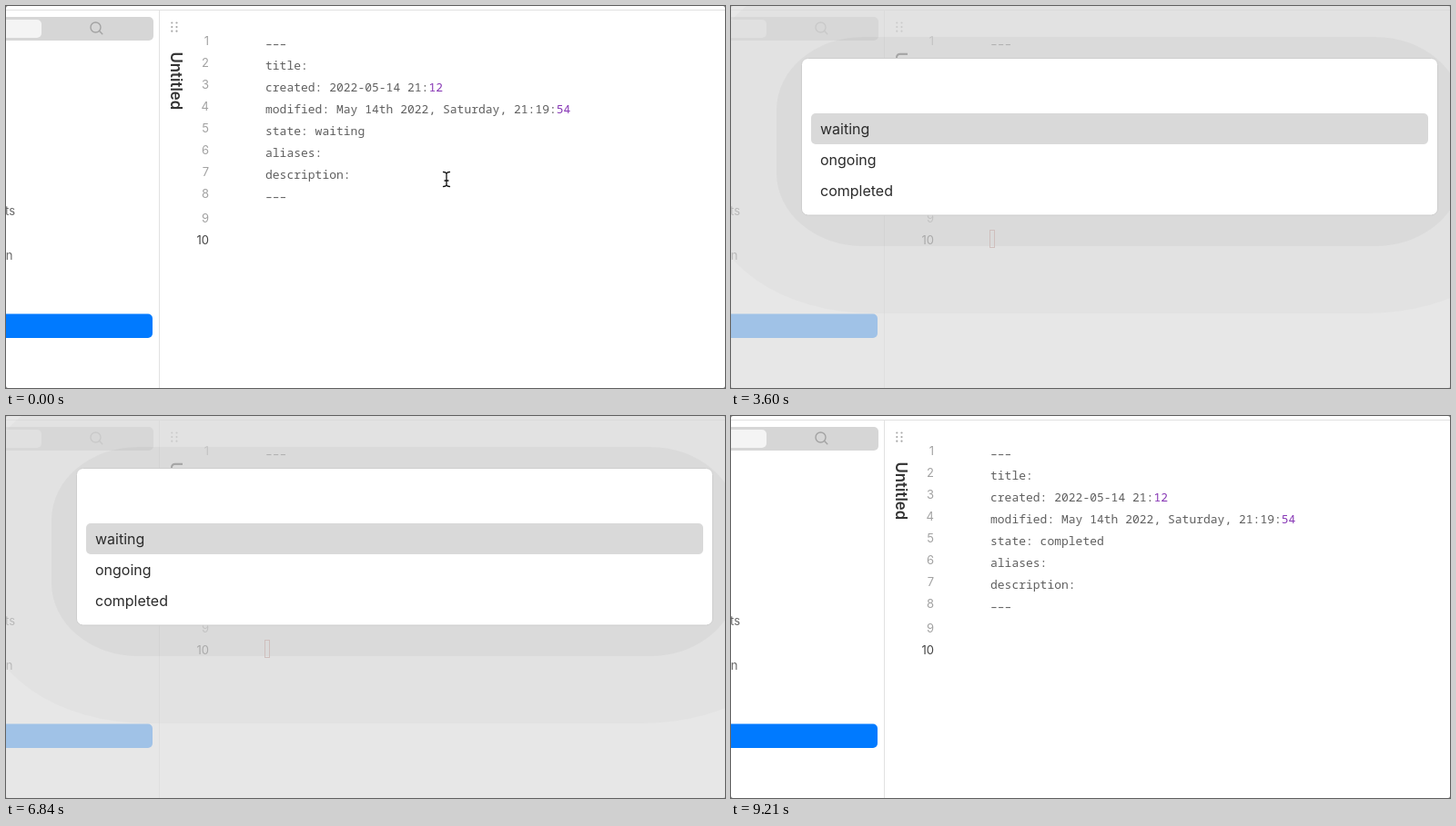
Write an HTML page that moves like this. It is 790 px wide and 420 px high and loops after 9.54 s.

```html
<!DOCTYPE html>
<html lang="en">
<head>
<meta charset="utf-8">
<title>Property switcher</title>
<style>
  html, body { margin: 0; width: 100%; height: 100%; overflow: hidden; background: #fff; }
  svg { display: block; width: 790px; height: 420px; }
  text { white-space: pre; }
  .ui { font-family: Inter, Roboto, sans-serif; font-size: 13px; fill: #666; }
  .code { font-family: "Noto Sans Mono", "DejaVu Sans Mono", monospace; font-size: 13px; fill: #5f5f5f; }
  .num { fill: #a2a2a2; text-anchor: end; }
  .item { font-size: 16px; fill: #2b2b2b; }
  .value { fill: #8737b5; }
</style>
</head>
<body>
<svg viewBox="0 0 790 420">
  <rect width="790" height="420" fill="#666"/>
  <rect width="790" height="420" rx="2" fill="#fff"/>
  <path d="M0 4.5H790M168.5 5V420" stroke="#e2e2e2" fill="none"/>

  <g id="sidebar">
    <rect x="-20" y="12" width="182" height="26" rx="5" fill="#d6d6d6"/>
    <rect x="-20" y="15" width="59" height="20" rx="5" fill="#f4f4f4"/>
    <g fill="none" stroke="#a3a3a3" stroke-width="1.4" stroke-linecap="round">
      <circle cx="98.5" cy="23.5" r="5.5"/>
      <path d="M102.6 27.6L105.8 30.8"/>
    </g>
    <text class="ui" x="10" y="230" text-anchor="end">ts</text>
    <text class="ui" x="7.5" y="279" text-anchor="end">n</text>
    <rect x="-20" y="338.5" width="181" height="26.5" rx="5" fill="#007aff"/>
  </g>

  <g id="grip" fill="#a8a8a8"></g>
  <text class="ui" transform="translate(180.5 50.5) rotate(90)" style="font-size:16.8px;font-weight:600;fill:#333">Untitled</text>
  <g id="editor"></g>
  <rect id="caret" x="285" y="247" width="4" height="18.5" fill="#0b7de0"/>

  <g id="overlay">
    <rect width="790" height="420" fill="#dedede" fill-opacity=".72"/>
    <rect id="outerShade" fill-opacity=".02"/>
    <rect id="innerShade" fill-opacity=".035"/>
    <rect x="284.5" y="246.5" width="5" height="19" fill="none" stroke="#cfbfbd"/>
    <rect id="panel" x="77.5" y="57.5" width="699" rx="7" fill="#fff" stroke="#cecece"/>
    <rect id="searchCaret" x="98" y="78.5" width="1" height="19" fill="#222"/>
    <rect id="selection" x="88" width="678" height="34" rx="5" fill="#d9d9d9"/>
    <g id="items"></g>
  </g>

  <g id="beam" fill="none" stroke-linecap="round">
    <path id="beamShape" d="M-3.5 -8Q-.8 -8 0 -6.2Q.8 -8 3.5 -8M-3.5 8Q-.8 8 0 6.2Q.8 8 3.5 8M0 -6.2V6.2M-2 1.5H2" stroke="#fff" stroke-width="2.6"/>
    <use href="#beamShape" style="display:none"/>
    <path d="M-3.5 -8Q-.8 -8 0 -6.2Q.8 -8 3.5 -8M-3.5 8Q-.8 8 0 6.2Q.8 8 3.5 8M0 -6.2V6.2M-2 1.5H2" stroke="#111" stroke-width="1.3"/>
  </g>
  <path id="arrow" transform="translate(391.8 170.2)" d="M0 0V14.3L3.2 11.4L5.4 16.8L7.8 15.8L5.6 10.5H10Z" fill="#000" stroke="#fff"/>
</svg>
<script>
const LOOP = 9540;
const $ = id => document.getElementById(id);

function add(parent, tag, attrs, content = '') {
  const el = document.createElementNS('http://www.w3.org/2000/svg', tag);
  for (const key in attrs) el.setAttribute(key, attrs[key]);
  el.textContent = content;
  parent.append(el);
  return el;
}
function set(el, attrs) {
  for (const key in attrs) el.setAttribute(key, attrs[key]);
}
const show = (id, on) => { $(id).style.display = on ? '' : 'none'; };

for (let i = 0; i < 6; i++) {
  add($('grip'), 'circle', { cx: 182.3 + i % 2 * 5.2, cy: 18.5 + (i >> 1) * 4.6, r: 1.1 });
}

const lines = ['–––', 'title:', 'created: 2022-05-14 21:|12',
  'modified: May 14th 2022, Saturday, 21:19:|54', 'state: waiting', 'aliases:', 'description:', '–––', '', ''];
const rows = lines.map((line, i) => {
  const [plain, value] = line.split('|');
  const late = i > 7 ? 3 : 0;
  const num = add($('editor'), 'text', { class: 'ui num', x: 223, y: 42.5 + i * 24 + late }, i + 1);
  if (i === 9) num.style.fill = '#444';
  const y = (line === '–––' ? 45.5 : 46) + i * 24;
  const row = add($('editor'), 'text', { class: 'code', x: 285, y }, plain);
  if (value) add(row, 'tspan', { class: 'value' }, value);
  return row;
});
const items = [0, 1, 2].map(i => add($('items'), 'text', { class: 'ui item', x: 98, y: 140.5 + i * 34 }));

// Each dialog: open, list shown, second pick, third pick, close
const dialogs = [[2220, 3180, 3780, Infinity, 4500], [5640, 6390, 6870, 7140, 7470]];
const searchCaretOn = [[2220, 2640], [3180, 3600], [4110, 4500], [5640, 6090], [6390, 6840], [7260, 7470]];
// Editor caret fades: start, end, final opacity
const caretFades = [[420, 540, 1], [960, 1050, 0], [1470, 1560, 1], [1950, 2040, 0], [4499, 4500, 1],
  [5040, 5130, 0], [5520, 5610, 1], [7920, 8040, 0], [8410, 8550, 1], [8920, 9060, 0]];
// Pointer keys: time, x, y
const path = [[0, 484, 190.5], [59, 484, 190.5], [60, 468, 180.5], [400, 468, 180.5], [650, 425, 160], [900, 358, 132],
  [1140, 336, 128], [1350, 339, 136], [1620, 392.5, 172], [8800, 392.5, 172], [9180, 465, 389]];

const clamp = v => Math.max(0, Math.min(1, v));

function caretOpacity(t) {
  return caretFades.reduce((a, [from, to, end]) => a + (end - a) * clamp((t - from) / (to - from)), 0);
}

function pointerAt(t) {
  let i = 1;
  while (i < path.length - 1 && t > path[i][0]) i++;
  const [t0, x0, y0] = path[i - 1], [t1, x1, y1] = path[i];
  const k = clamp((t - t0) / (t1 - t0));
  return [x0 + (x1 - x0) * k, y0 + (y1 - y0) * k];
}

function drawDialog(t, [, list, second, third]) {
  const listed = t >= list;
  const grow = listed ? 68 : 0;
  const names = listed ? ['waiting', 'ongoing', 'completed'] : ['state', '', ''];
  const picked = (t >= second) + (t >= third);
  items.forEach((el, i) => { el.textContent = names[i]; });
  $('selection').setAttribute('y', 118 + picked * 34);
  $('panel').setAttribute('height', 104.5 + grow);
  const left = listed ? 50 : 63;
  set($('innerShade'), { x: left, y: 34, width: 853 - 2 * left, height: 162 + grow, rx: 95, ry: 80 });
  set($('outerShade'), { x: -25, y: -45, width: 905, height: 315 + grow, rx: 180, ry: 125 });
  show('searchCaret', searchCaretOn.some(([a, b]) => t >= a && t < b));
}

function render(t) {
  rows[4].textContent = 'state: ' + (t < 4500 ? 'waiting' : t < 7470 ? 'ongoing' : 'completed');
  const dialog = dialogs.find(d => t >= d[0] && t < d[4]);
  show('overlay', dialog);
  if (dialog) drawDialog(t, dialog);
  $('caret').setAttribute('opacity', dialog ? 0 : caretOpacity(t));
  show('arrow', t >= 2220 && t < 3030);
  show('beam', t < 2220 || t >= 8820 && t < 9180);
  $('beam').setAttribute('transform', `translate(${pointerAt(t)})`);
}

const start = performance.now();
function tick() {
  render((performance.now() - start) % LOOP);
  requestAnimationFrame(tick);
}
tick();
</script>
</body>
</html>
```
